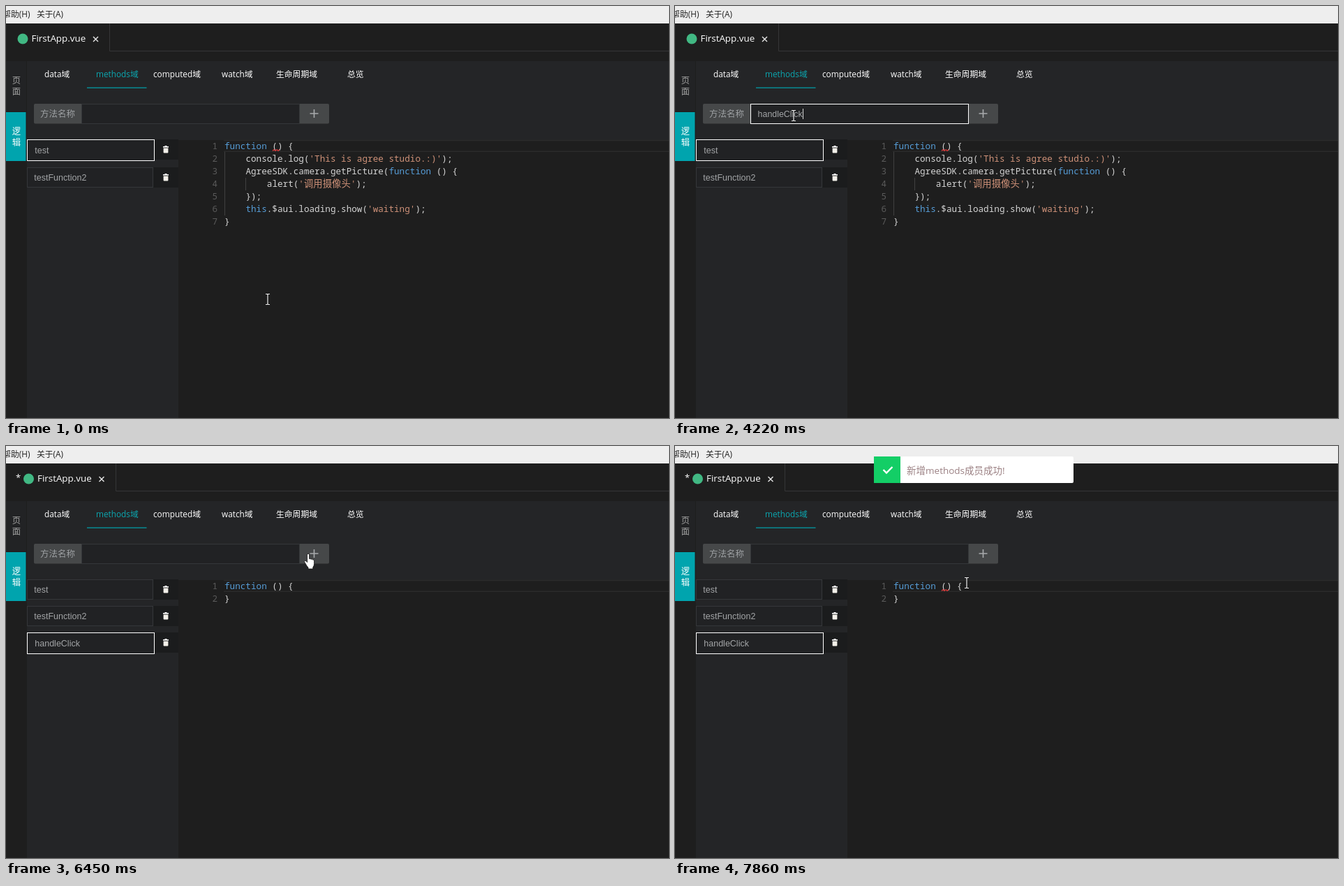
An HTML page that plays this animation: 950 px wide and 590 px high, repeating every 8000 ms.

```html
<!DOCTYPE html>
<html lang="zh-CN">
<head>
<meta charset="utf-8">
<style>
  html, body { margin: 0; width: 100%; height: 100%; overflow: hidden; background: #1e1e1e; }
  svg { display: block; font-family: "Open Sans", "Noto Sans CJK SC", "Noto Sans CJK", sans-serif; }
  text { white-space: pre; }
  .field { font-family: "Liberation Sans", sans-serif; font-size: 12.5px; fill: #a3a5a7; }
  .code { font-family: "Noto Sans Mono", "Noto Sans CJK SC", monospace; font-size: 12.67px; fill: #d4d4d4; }
  .k { fill: #569cd6; }
  .s { fill: #ce9178; }
  .cjk { font-size: 13.4px; }
  .num { fill: #5a5a5a; text-anchor: end; }
</style>
</head>
<body>
<svg id="stage" width="950" height="590" viewBox="0 0 950 590"></svg>
<script>
const LOOP = 8000, SAVED = 6450, BLUR = 6180, CLICK = 810;

const rect = (x, y, w, h, fill, extra = '') =>
  `<rect x="${x}" y="${y}" width="${w}" height="${h}" fill="${fill}" ${extra}/>`;
const box = (x, y, w, h, fill, stroke, extra = '') =>
  rect(x + .5, y + .5, w - 1, h - 1, fill, `stroke="${stroke}" ${extra}`);
const text = (x, y, str, size, fill, extra = '') =>
  `<text x="${x}" y="${y}" font-size="${size}" fill="${fill}" ${extra}>${str}</text>`;
const path = (d, stroke, width = 1, extra = '') =>
  `<path d="${d}" fill="none" stroke="${stroke}" stroke-width="${width}" ${extra}/>`;

function fileTab(dx, right, star) {
  return rect(0, 25, right, 40, '#1e1e1e') +
    path(`M${right + .5} 25V64.5H950`, '#353637') +
    (star ? text(14, 50, '*', 13, '#fff') : '') +
    `<circle cx="${24 + dx}" cy="47" r="7.5" fill="#41b883"/>` +
    text(36.5 + dx, 51.3, 'FirstApp.vue', 13.4, '#fff') +
    path(`M${125 + dx} 44l7 7m0-7l-7 7`, '#e8e8e8', 1.4);
}

function trash(y) {
  return `<g transform="translate(225 ${y})">` +
    rect(2.5, 0, 3, 1, '#fff') + rect(0, 1, 8, 1.6, '#fff') +
    '<path d="M.6 3.5h6.8v6q0 1-1 1h-4.8q-1 0-1-1z" fill="#f4f1ea"/></g>';
}

function list(names, active) {
  let y = 191;
  return names.map((name, i) => {
    const on = i === active, h = on ? 31 : 29;
    const row = rect(211, y, 36, 29, '#1b1c1d') +
      box(30, y, on ? 183 : 181, h, '#212224', on ? '#fff' : '#35373a', on ? '' : `id="item${names.length}${i}"`) +
      `<text class="field" x="${on ? 41.3 : 40.3}" y="${y + (on ? 20 : 19)}">${name}</text>` +
      trash(y + 9);
    y += h + 9;
    return row;
  }).join('');
}

const key = s => `<tspan class="k">${s}</tspan>`;
const str = s => `<tspan class="s">${s}</tspan>`;

function code(lines) {
  return lines.map(([indent, line], i) => {
    const y = 204.7 + i * 18.13;
    return `<text class="code num" x="303" y="${y}">${i + 1}</text>` +
      `<text class="code" x="${313 + indent * 7.6}" y="${y}">${line}</text>`;
  }).join('');
}
const squiggle = id => path('M382 207.5l2-2 2 2 2-2 2 2 2-2', '#e03a3a', 1.1, `id="${id}"`);

const tabs = [[55, 'data域'], [129, 'methods域'], [211, 'computed域'],
  [309, 'watch域'], [387, '生命周期域'], [489, '总览']];

const base =
  rect(0, 0, 950, 25, '#eeeeee') +
  text(34.5, 16.3, '帮助(H)', 11.8, '#222', 'text-anchor="end"') +
  text(44, 16.3, '关于(A)', 11.8, '#222') +
  rect(0, 25, 950, 565, '#1e1e1e') +
  rect(30, 79, 920, 113, '#242527') + rect(30, 192, 217, 398, '#242527') +
  rect(0, 79, 29, 72, '#222325') + rect(0, 152, 28.5, 70, '#00a4ae') +
  [['页', 110.5, '#a0a0a0'], ['面', 126.5, '#a0a0a0'], ['逻', 183.5, '#fff'], ['辑', 199.5, '#fff']]
    .map(([c, y, fill]) => text(8.8, y, c, 12.3, fill)).join('') +
  tabs.map(([x, s], i) => text(x, 102, s, 11.8, i === 1 ? '#0ba7b0' : '#fff', i === 1 ? '' : 'font-weight="500"')).join('') +
  rect(116, 116.5, 85.5, 1.2, '#00a4ae') +
  '<path d="M109 140v28.5H42q-2 0-2-2V142q0-2 2-2z" fill="#464849"/>' +
  text(49, 159, '方法名称', 12.5, '#9da0a3') +
  '<path d="M420 140v28.5h41q2 0 2-2V142q0-2-2-2z" fill="#464849"/>' +
  path('M435.5 154h12m-6-6v12', '#a9abad', 1.6) +
  box(108, 140, 313, 29, '#212224', '#35373a', 'id="input"') +
  '<text class="field" id="typed" x="118.6" y="158.8" style="font-size:12.4px"></text>' +
  rect(119, 147, 1, 15, '#d8d8d8', 'id="caret"') +
  path('M312 192.5H950M312 208.3H950', '#2b2b2b', 1.5);

const before = fileTab(0, 148, false) + list(['test', 'testFunction2'], 0) +
  path('M313.5 209V300', '#404040') + path('M343.5 246V264', '#404040') +
  code([
    [0, key('function') + ' () {'],
    [4, `console.log(${str("'This is agree studio.:)'")});`],
    [4, `AgreeSDK.camera.getPicture(${key('function')} () {`],
    [8, `alert(${str("'<tspan class='cjk'>调用摄像头</tspan>'")});`],
    [4, '});'],
    [4, `${key('this')}.$aui.loading.show(${str("'waiting'")});`],
    [0, '}']
  ]) + squiggle('error1');

const after = fileTab(8.5, 157, true) + list(['test', 'testFunction2', 'handleClick'], 2) +
  code([[0, key('function') + ' () {'], [0, '}']]) + squiggle('error2');

const message = rect(285, 0, 286, 38, '#fff', 'rx="2"') + rect(285, 0, 38, 38, '#13ce66') +
  path('M298.5 19l4.5 4.5 8.5-8.5', '#fff', 2.4) +
  text(332, 24.5, '新增methods成员成功!', 13.5, '#9b8083');

const beam = 'M-3-7.5h2.2l.8.8.8-.8H3M0-7V7M-3 7.5h2.2l.8-.8.8.8H3';
const pointers = {
  beam: path(beam, '#111', 2.4, 'opacity=".55"') + path(beam, '#f2f2f2', 1.2),
  arrow: '<path d="M0 0v16.5l3.8-3.6 2.5 5.8 2.4-1-2.5-5.7h5.3z" fill="#fff" stroke="#111" stroke-width=".8"/>',
  hand: '<path transform="translate(-6 -1)" d="M4.6 2q1.5-1.6 3 0v6.6q1.7-.8 2.4.6 1.7-.8 2.3.6 1.9-.4 2.3 1.2v4.6q0 3-1.8 5.2V23H6v-2Q3.6 18.600 2.2 15.500L.5 12.700Q.8 10.600 2.900 11.500l1.700 2z" fill="#fff" stroke="#111" stroke-width=".8"/>'
};

const stage = document.getElementById('stage');
stage.innerHTML = base + `<g id="before">${before}</g><g id="after">${after}</g><g id="message">${message}</g>` +
  '<g id="pointer">' + Object.entries(pointers).map(([k, s]) => `<g id="${k}">${s}</g>`).join('') + '</g>';

const el = id => document.getElementById(id);
const show = (id, on) => el(id).setAttribute('visibility', on ? 'inherit' : 'hidden');

// start, end, steps, then from, control and to points
const moves = [
  [60, 650, 14, [375, 420], [195, 262], [175, 160]],
  [CLICK, 840, 2, [175, 160], [172, 158], [170, 157]],
  [5210, 5870, 15, [170, 157], [310, 221], [431, 154]],
  [BLUR, 6270, 3, [431, 154], [432, 154], [433, 154]],
  [7640, 7860, 5, [433, 154], [420, 176], [418, 196]]
];

function pointerAt(t) {
  let pos = moves[0][3];
  for (const [start, end, n, a, c, b] of moves) {
    if (t < start) break;
    const step = Math.min(n, Math.floor((t - start) / (end - start) * (n - 1) + 1e-6) + 1);
    const p = step / n, u = (1 - Math.cos(Math.PI * p)) / 2;
    pos = a.map((v, i) => Math.round((1 - u) ** 2 * v + 2 * u * (1 - u) * c[i] + u * u * b[i]));
  }
  return pos;
}

const inside = ([x, y], l, t, r, b) => x >= l && x < r && y >= t && y < b;

function pointerKind(p) {
  if (inside(p, 420, 140, 463, 169)) return 'hand';
  return inside(p, 108, 140, 420, 169) || inside(p, 306, 192, 950, 590) ? 'beam' : 'arrow';
}

const WORD = 'handleClick';
const keys = [1700, 1760, 1950, 2220, 2500, 2580, 3050, 3760, 3950, 4040, 4220];

const paused = (frames, duration) => {
  const a = el('message').animate(frames, { duration, delay: SAVED, easing: 'ease', fill: 'both' });
  a.pause();
  return a;
};
const slides = [
  paused([{ transform: 'translateY(-23px)' }, { transform: 'translateY(15px)' }], 300),
  paused([{ opacity: 0 }, { opacity: 1 }], 240)
];

function render(t) {
  const saved = t >= SAVED;
  show('before', !saved);
  show('after', saved);
  show('message', saved);
  show('error1', !saved);
  show('error2', t >= 6860);
  slides.forEach(a => { a.currentTime = t; });

  const pos = pointerAt(t), kind = pointerKind(pos);
  el('pointer').setAttribute('transform', `translate(${pos[0]} ${pos[1]})`);
  for (const k in pointers) show(k, k === kind);

  const focused = t >= CLICK && t < BLUR;
  const hover = t < CLICK && inside(pos, 108, 140, 420, 169);
  el('input').setAttribute('stroke', focused || hover ? '#fff' : '#35373a');
  el('item21').setAttribute('stroke', inside(pos, 30, 231, 211, 260) ? '#fff' : '#35373a');

  const count = saved ? 0 : keys.filter(k => k <= t).length;
  const typed = el('typed');
  typed.textContent = WORD.slice(0, count);
  const since = t - (count ? keys[count - 1] : 835);
  const lit = Math.floor(Math.max(0, since) / 495) % 2 === 0;
  show('caret', focused && lit);
  el('caret').setAttribute('x', Math.round(118.6 + (count ? typed.getComputedTextLength() : 0)));
}

const origin = performance.now();
function tick() {
  render((performance.now() - origin) % LOOP);
  requestAnimationFrame(tick);
}
tick();
</script>
</body>
</html>
```
